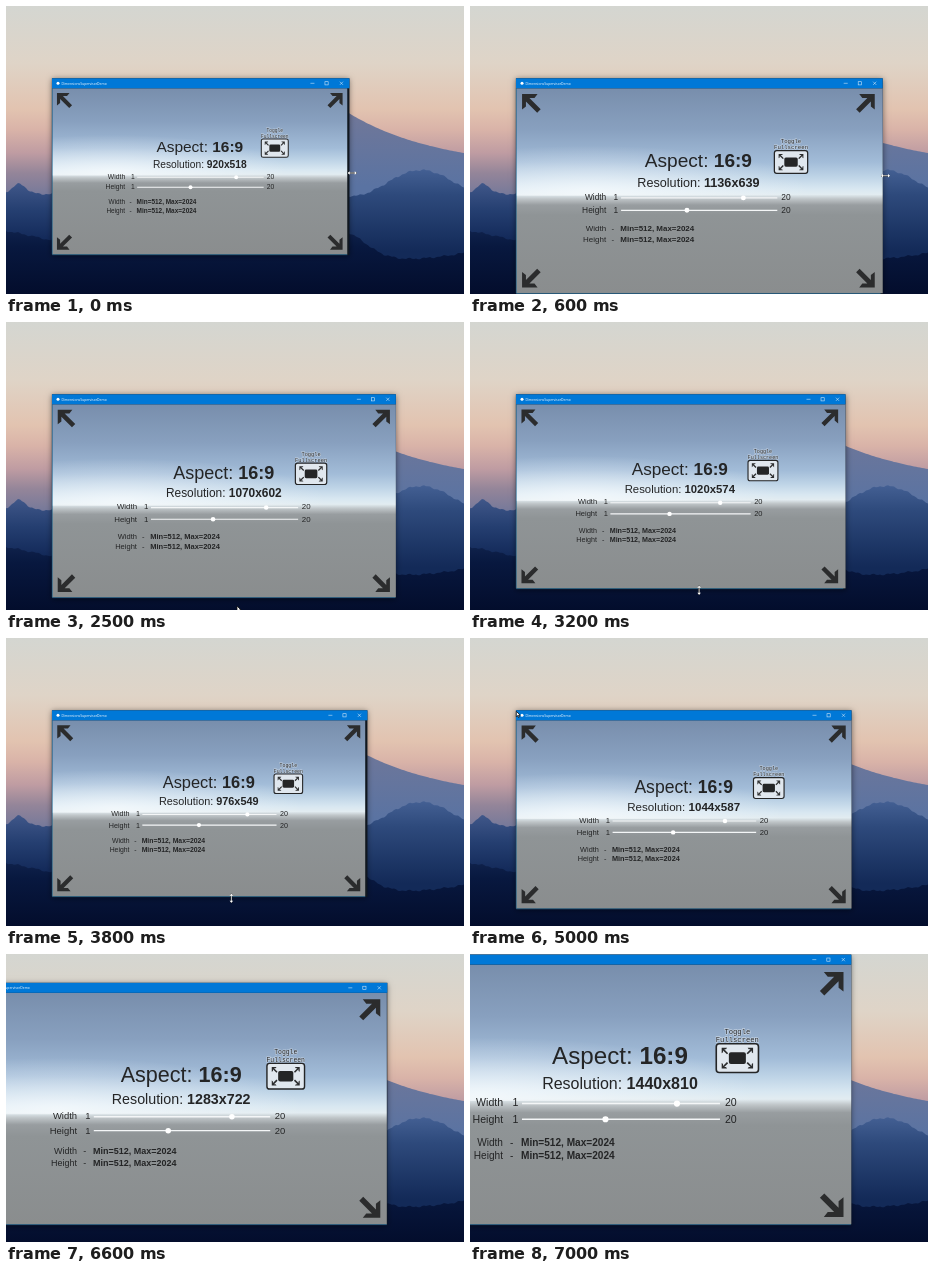
These frames come from a looping animation (458 by 288 pixels, 7100 ms). An HTML page with a canvas:

```html
<!DOCTYPE html>
<html lang="en">
<head>
<meta charset="utf-8">
<title>Window resize</title>
<style>
html, body { margin: 0; width: 100%; height: 100%; overflow: hidden; background: #04102f; }
canvas { display: block; }
</style>
</head>
<body>
<canvas id="stage" width="458" height="288"></canvas>
<script>
const ctx = document.getElementById('stage').getContext('2d');
const LOOP = 7100, STEP = 100;
const UNIT = 0.3206;            // stage pixels per reported pixel
const BAR = 10;                 // title bar height
const SANS = '"Liberation Sans", Arial, sans-serif';
const MONO = '"Liberation Mono", monospace';
const INK = '#242526';
const { PI, sin, cos, exp } = Math;

const clamp = v => Math.min(1, Math.max(0, v));
const mix = (a, b, p) => a + (b - a) * p;
const bump = (x, center, spread) => exp(-(((x - center) / spread) ** 2));

// Three drags: right edge, bottom edge, top left corner
const SIDE = { start: 0, end: 1800 };
const BASE = { start: 2900, end: 4500 };
const CORNER = { start: 5700, end: 7000 };
const progress = (drag, t) => clamp((t - drag.start) / (drag.end - drag.start));
const during = (drag, t) => t >= drag.start && t < drag.end;

function widthAt(t) {
  const side = progress(SIDE, t), base = progress(BASE, t), corner = progress(CORNER, t);
  return 920 + 150 * side + 192.2 * sin(2 * PI * side)
    - 26 * base - 80.9 * sin(PI * base)
    + 396 * corner ** 1.37;
}

function fade(top, bottom, ...stops) {
  const g = ctx.createLinearGradient(0, top, 0, bottom);
  for (let i = 0; i < stops.length; i += 2) g.addColorStop(stops[i], stops[i + 1]);
  return g;
}

function rect(fill, x, y, w, h) {
  ctx.fillStyle = fill;
  ctx.fillRect(x, y, w, h);
}

function polygon(fill, pts) {
  ctx.beginPath();
  for (let i = 0; i < pts.length; i += 2) ctx.lineTo(pts[i], pts[i + 1]);
  ctx.closePath();
  ctx.fillStyle = fill;
  ctx.fill();
}

// Everything below the curve height(x)
function ridge(fill, x0, x1, height) {
  ctx.beginPath();
  ctx.moveTo(x0, 288);
  for (let x = x0; x <= x1; x += 2) ctx.lineTo(x, height(x));
  ctx.lineTo(x1, 288);
  ctx.fillStyle = fill;
  ctx.fill();
}

function line(color, width, ...pts) {
  ctx.beginPath();
  for (let i = 0; i < pts.length; i += 4) {
    ctx.moveTo(pts[i], pts[i + 1]);
    ctx.lineTo(pts[i + 2], pts[i + 3]);
  }
  ctx.strokeStyle = color;
  ctx.lineWidth = width;
  ctx.stroke();
}

function dot(x, y, r) {
  ctx.beginPath();
  ctx.arc(x, y, r, 0, 7);
  ctx.fillStyle = '#fff';
  ctx.fill();
}

function text(str, x, y, font, align = 'left', fill = INK) {
  ctx.font = font;
  ctx.textAlign = align;
  ctx.fillStyle = fill;
  ctx.fillText(str, x, y);
}

// Plain label followed by a bold value, centred on x = 0
function heading(label, value, y, size) {
  const plain = `${size}px ${SANS}`, bold = `bold ${size}px ${SANS}`;
  ctx.font = bold;
  const valueWidth = ctx.measureText(value).width;
  ctx.font = plain;
  const labelWidth = ctx.measureText(label).width;
  const x = -(labelWidth + valueWidth) / 2;
  text(label, x, y, plain);
  text(value, x + labelWidth, y, bold);
}

// Four arrows pointing out to the corners of a box centred on (cx, cy)
function corners(cx, cy, halfW, halfH, size) {
  for (const sx of [-1, 1]) for (const sy of [-1, 1]) {
    ctx.save();
    ctx.translate(cx + sx * halfW, cy + sy * halfH);
    ctx.scale(-sx * size / 24, -sy * size / 24);
    polygon('#2b2c2d', [0, 0, 20, 0, 16, 5, 9.5, 5, 24, 19.5, 19.5, 24, 5, 9.5, 5, 16, 0, 20]);
    ctx.restore();
  }
}

function landscape() {
  const rough = x => 0.5 * sin(x * 0.9) + 0.6 * sin(x * 0.37);
  rect(fade(0, 288, 0, '#d4d6d1', 0.2, '#dfd4c7', 0.36, '#e2c3b0', 0.43, '#d9b3a8',
    0.51, '#bf9ca2', 0.58, '#948599', 0.66, '#74789a'), 0, 0, 458, 288);
  ridge(fade(74, 180, 0, '#8f7c8a', 0.35, '#6f7799', 1, '#5a73a2'), 300, 458,
    x => 163 - 89 * exp((300 - x) / 92));
  ridge(fade(158, 245, 0, '#486498', 0.35, '#2e4a7c', 1, '#132a58'), 280, 458,
    x => 177 - 13 * cos((x - 415) / 22) + rough(x));
  ridge(fade(177, 245, 0, '#405789', 0.4, '#253f71', 1, '#0c2150'), 0, 300,
    x => 188 - 10 * bump(x, 13, 10) + rough(x));
  ridge(fade(215, 288, 0, '#132752', 0.35, '#08183f', 1, '#030d2c'), 0, 458,
    x => 232 + x * 0.03 + 9 * sin((x - 40) / 45) - 20 * bump(x, 338, 30) + rough(x));
}

function slider(label, y, labelY, knob) {
  const font = `10.6px ${SANS}`;
  text(label, -116.8, labelY, font, 'right');
  text('1', -107.5, labelY, font);
  text('20', 105, labelY, font);
  line('#f4f6f7', 1.6, -98, y, 100, y);
  dot(knob, y, 3.1);
}

function limits(label, y) {
  text(label, -117, y, `10.1px ${SANS}`, 'right');
  text('-', -110, y, `10.1px ${SANS}`);
  text('Min=512, Max=2024', -99, y, `bold 10.1px ${SANS}`);
}

function roundBox(x, y, w, h, r, fill) {
  ctx.beginPath();
  ctx.roundRect(x - w / 2, y - h / 2, w, h, r);
  ctx.fillStyle = fill;
  ctx.fill();
}

function button(x, y) {
  const font = `7.2px ${MONO}`;
  ['Toggle', 'Fullscreen'].forEach((word, row) => {
    const base = y - 24.5 + row * 8.2;
    ctx.font = font;
    ctx.textAlign = 'center';
    ctx.strokeStyle = 'rgba(235,240,245,.55)';
    ctx.lineWidth = 1.4;
    ctx.strokeText(word, x, base);
    text(word, x, base, font, 'center');
  });
  roundBox(x, y, 42.2, 28.8, 3, '#e0e7ee');
  ctx.strokeStyle = INK;
  ctx.lineWidth = 1.6;
  ctx.stroke();
  roundBox(x, y, 17, 11.6, 2, INK);
  corners(x, y, 15.7, 10.3, 6.5);
}

function sky(left, top, w, h) {
  rect(fade(top, top + h, 0, '#788eac', 0.2, '#88a0bf', 0.36, '#a2bcd8', 0.43, '#bdd3e6',
    0.49, '#d8e7f1', 0.518, '#e2ecf1', 0.54, '#bfc5c8', 0.57, '#989da0', 0.62, '#8f9496',
    1, '#8a8d8e'), left, top, w, h);
  // Brighter haze towards the left end of the horizon
  ctx.save();
  ctx.beginPath();
  ctx.rect(left, top, w, h * 0.525);
  ctx.clip();
  ctx.translate(left + w * 0.2, top + h * 0.5);
  ctx.scale(w * 0.6, h * 0.22);
  const glow = ctx.createRadialGradient(0, 0, 0, 0, 0, 1);
  glow.addColorStop(0, 'rgba(250,253,255,.7)');
  glow.addColorStop(1, 'rgba(250,253,255,0)');
  rect(glow, -1, -1, 2, 2);
  ctx.restore();
}

function interfaceLayer(left, top, w, h, width, height) {
  ctx.save();
  ctx.translate(left + w / 2, top + h / 2);
  const k = width / 1440;
  ctx.scale(k, k);
  corners(0, 0, w / 2 / k - 7.3, h / 2 / k - 7.3, 23.6);
  heading('Aspect: ', '16:9', -30, 24.2);
  heading('Resolution: ', `${width}x${height}`, -5, 16);
  slider('Width', 9.1, 11.4, 57);
  slider('Height', 24.8, 28.4, -14.5);
  limits('Width', 51.2);
  limits('Height', 64.7);
  button(117.4, -36.3);
  ctx.restore();
}

function titleBar(left, top, right) {
  const y = top + BAR / 2, x = right - 8, pale = 'rgba(255,255,255,.8)';
  rect('#0078d7', left, top, right - left, BAR);
  dot(left + 6, y, 1.5);
  text('DimensionsSupervisorDemo', left + 9.5, y + 1.3, '3.4px "Open Sans", sans-serif', 'left', '#fff');
  line(pale, 0.6, x - 31, y, x - 27, y);
  line(pale, 0.6, x - 1.6, y - 1.6, x + 1.6, y + 1.6, x - 1.6, y + 1.6, x + 1.6, y - 1.6);
  ctx.strokeRect(x - 16.5, y - 1.6, 3.2, 3.2);
}

function appWindow(left, top, w, h, width, height, lag, growing) {
  ctx.save();
  ctx.shadowColor = 'rgba(0,0,0,.5)';
  ctx.shadowBlur = 6;
  ctx.shadowOffsetY = 1;
  rect('#10171f', left - 0.4, top - BAR, w + lag + 0.4, h + BAR + 0.6);
  ctx.restore();
  // While the frame grows, the new strip is still unpainted
  sky(left, top, growing ? w : w + lag, h);
  interfaceLayer(left, top, w, h, width, height);
  line('#2f7fae', 0.6, left, top + h + 0.3, left + w, top + h + 0.3, left, top, left, top + h);
  titleBar(left - 0.3, top - BAR, left + w + lag);
}

// Angle of a resize pointer, or null for the plain arrow
function pointer(x, y, angle) {
  ctx.save();
  ctx.translate(x, y);
  ctx.lineJoin = 'round';
  ctx.strokeStyle = '#111';
  ctx.lineWidth = 0.8;
  if (angle === null) {
    polygon('#fff', [0, 0, 0, 5.5, 1.3, 4.3, 2.2, 6.2, 3, 5.8, 2.2, 4, 4, 4]);
    ctx.stroke();
  } else {
    ctx.rotate(angle);
    line('#111', 1.6, -4.5, 0, 4.5, 0);
    line('#fff', 0.8, -4, 0, 4, 0);
    for (const s of [-1, 1]) polygon('#fff', [4.5 * s, 0, 2.5 * s, -1.8, 2.5 * s, 1.8]);
  }
  ctx.restore();
}

function glide(t, start, end, x0, y0, x1, y1) {
  const p = clamp((t - start) / (end - start));
  const eased = 1 - (1 - p) ** 2;
  pointer(mix(x0, x1, eased), mix(y0, y1, eased), null);
}

function drawPointer(t, left, top, right, bottom) {
  if (during(SIDE, t)) pointer(right + 5, 167 + t / 220, 0);
  else if (t < 2500) glide(t, SIDE.end, 2400, right + 5, 175, 231, 284);
  else if (t < BASE.start) glide(t, 2500, 2700, 231, 284, 231, 276);
  else if (during(BASE, t)) pointer(mix(231, 221, progress(BASE, t)), bottom + 2, PI / 2);
  else if (t < CORNER.start) glide(t, BASE.end, 5000, 221, bottom, left, top + 1);
  else pointer(left - 4, top + 3, PI / 4);
}

function draw(t) {
  const width = Math.round(widthAt(t)), height = Math.round(width * 9 / 16);
  const w = width * UNIT, h = height * UNIT;
  const fromCorner = t >= CORNER.start;
  const left = fromCorner ? 380.8 - w : 46.3;
  const top = fromCorner ? 270.3 - h : 82.3;
  const lag = during(SIDE, t) || during(BASE, t) ? 2.2 : 0.5;
  landscape();
  appWindow(left, top, w, h, width, height, lag, widthAt(t + STEP) > widthAt(t));
  drawPointer(t, left, top - BAR, left + w, top + h);
}

function tick() {
  const t = performance.now() % LOOP;
  draw(Math.floor(t / STEP) * STEP);
  requestAnimationFrame(tick);
}
tick();
</script>
</body>
</html>
```
